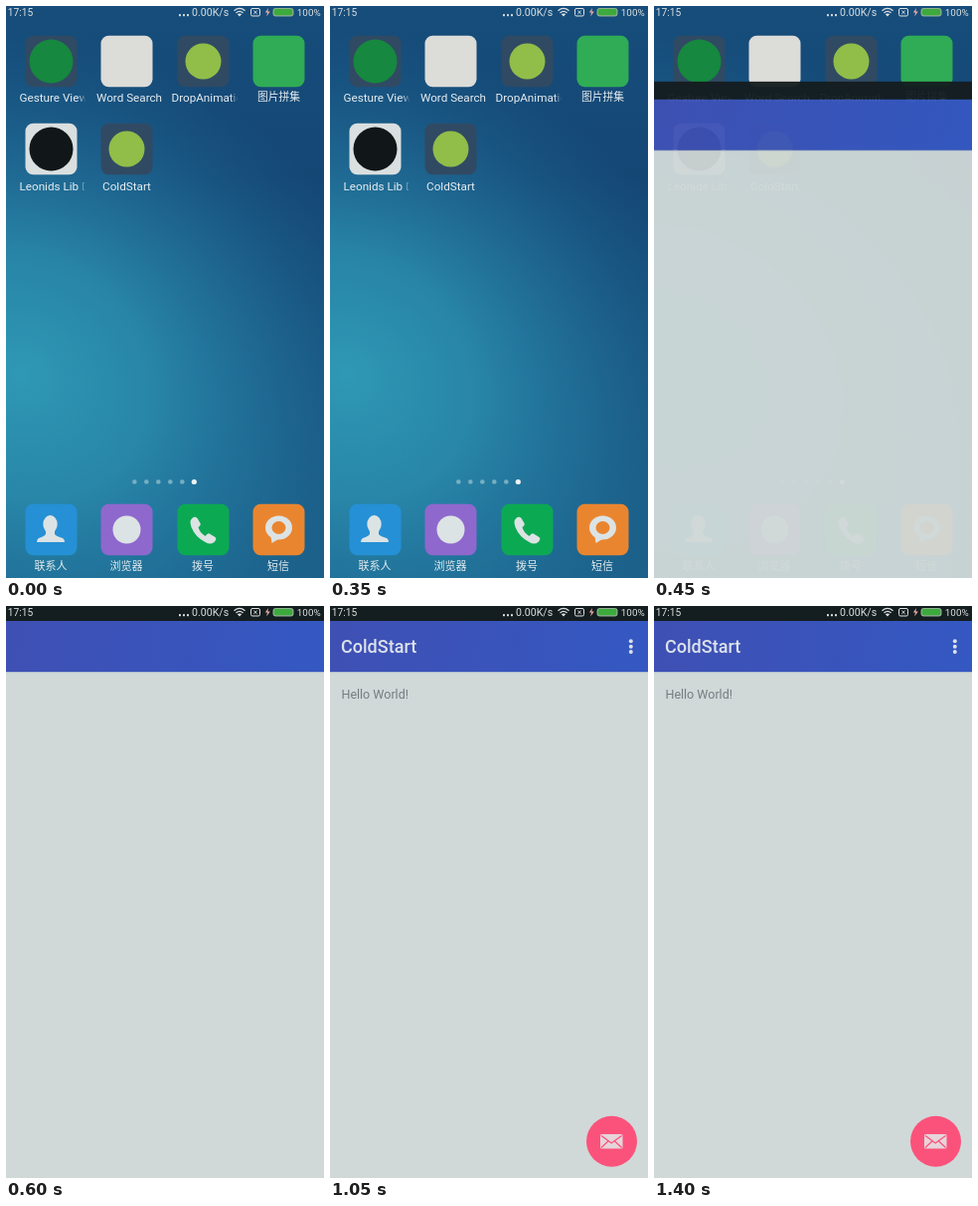
An HTML page with a canvas that plays this animation: 320x574 px, repeating every 1.45 s.

```html
<!DOCTYPE html>
<html lang="en">
<head>
<meta charset="utf-8">
<title>Cold start</title>
<style>
html, body { margin: 0; width: 100%; height: 100%; overflow: hidden; background: #145080; }
canvas { display: block; width: 320px; height: 574px; }
</style>
</head>
<body>
<canvas id="stage"></canvas>
<script>
const W = 320, H = 574, LOOP = 1450, STEP = 50;
const OPEN_START = 360, OPEN_TIME = 240, FADE_TIME = 140, CONTENT_AT = 1050;
const FONT = 'Roboto, "Noto Sans CJK SC", "Noto Sans CJK", sans-serif';
const COLUMNS = [45.5, 121.5, 198.5, 274.5];
const TILE = '#304a63';

const canvas = document.getElementById('stage');
const ctx = canvas.getContext('2d');
const ratio = window.devicePixelRatio || 1;
canvas.width = W * ratio;
canvas.height = H * ratio;
ctx.scale(ratio, ratio);

function rect(x, y, w, h, color) {
  ctx.fillStyle = color;
  ctx.fillRect(x, y, w, h);
}

function round(x, y, w, h, r, color) {
  ctx.fillStyle = color;
  ctx.beginPath();
  ctx.roundRect(x, y, w, h, r);
  ctx.fill();
}

function ellipse(x, y, rx, ry, color) {
  ctx.fillStyle = color;
  ctx.beginPath();
  ctx.ellipse(x, y, rx, ry, 0, 0, Math.PI * 2);
  ctx.fill();
}

function disc(x, y, r, color) {
  ellipse(x, y, r, r, color);
}

function shape(path, color, x = 0, y = 0) {
  ctx.save();
  ctx.translate(x, y);
  ctx.fillStyle = color;
  ctx.fill(new Path2D(path));
  ctx.restore();
}

function stroke(path, color, width) {
  ctx.strokeStyle = color;
  ctx.lineWidth = width;
  ctx.stroke(new Path2D(path));
}

function text(str, x, y, size, color, weight = 400, align = 'left') {
  ctx.font = `${weight} ${size}px ${FONT}`;
  ctx.textAlign = align;
  ctx.textBaseline = 'middle';
  ctx.fillStyle = color;
  ctx.fillText(str, x, y);
}

// Labels too wide for their cell fade out at the right edge.
function label(str, cx, y, size = 11.7) {
  ctx.font = `400 ${size}px ${FONT}`;
  if (ctx.measureText(str).width <= 67.5) {
    text(str, cx, y, size, '#e6edef', 400, 'center');
    return;
  }
  const left = cx - 32, right = cx + 35;
  const fade = ctx.createLinearGradient(left, 0, right, 0);
  fade.addColorStop(0, '#e6edef');
  fade.addColorStop(0.88, '#e6edef');
  fade.addColorStop(1, '#e6edef00');
  text(str, left, y, size, fade);
}

function wallpaper() {
  const base = ctx.createLinearGradient(0, 0, 0, H);
  base.addColorStop(0, '#164d7b');
  base.addColorStop(0.3, '#154775');
  base.addColorStop(1, '#1b5f88');
  rect(0, 0, W, H, base);

  ctx.save();
  ctx.translate(15, 370);
  ctx.rotate(0.5);
  ctx.scale(1, 0.88);
  const glow = ctx.createRadialGradient(0, 0, 0, 0, 0, 390);
  glow.addColorStop(0, 'rgba(48,156,184,.95)');
  glow.addColorStop(0.35, 'rgba(44,146,178,.8)');
  glow.addColorStop(0.65, 'rgba(38,130,170,.45)');
  glow.addColorStop(1, 'rgba(28,105,150,0)');
  rect(-600, -700, 1300, 1400, glow);
  ctx.restore();
}

function tile(cx, y, color, dot, r) {
  round(cx - 26, y - 0.3, 52, 51.6, 8, color);
  if (dot) disc(cx, y + 25.5, r, dot);
}

function dock() {
  const [a, b, c, d] = COLUMNS;
  const glyph = '#dce3e4', orange = '#ea852f';
  tile(a, 500, '#2590d5');
  tile(b, 500, '#8e68cd', glyph, 14);
  tile(c, 500, '#0ca953');
  tile(d, 500, orange);

  ellipse(a - 1, 520, 7.2, 9, glyph);
  shape('M-5 25h9v5q1 2 8 4q2 1 2 4h-28q0-3 2-4q6-2 7-4z', glyph, a - 0.5, 500);
  shape('M-12-10q3-4 6-1l3 5q1 2-2 4q1 5 7 9q3-4 5-2l5 3q2 2-1 5q-4 3-9 0q-10-5-14-15q-2-6 0-8z', glyph, c, 525);
  ellipse(d, 523.5, 13.5, 12, glyph);
  shape('M-8 32L-7 39L3 33z', glyph, d, 500);
  ellipse(d, 523.5, 7, 6.4, orange);

  ['联系人', '浏览器', '拨号', '短信'].forEach((s, i) => label(s, COLUMNS[i] - 0.5, 562.5, 11));
}

function home() {
  wallpaper();
  const [a, b, c, d] = COLUMNS;
  tile(a, 30, TILE, '#16883f', 22);
  tile(b, 30, '#dcdcd8');
  tile(c, 30, TILE, '#91bd49', 18);
  tile(d, 30, '#2fac55');
  tile(a, 118, '#dadfdf', '#111718', 22);
  tile(b, 118, TILE, '#91bd49', 18);

  label('Gesture View', a, 92.5);
  label('Word Search', b + 2.5, 92.5);
  label('DropAnimation', c, 92.5);
  label('图片拼集', d, 92, 10.8);
  label('Leonids Lib Demo', a, 181.5);
  label('ColdStart', b, 181.5);

  for (let i = 0; i < 6; i++) {
    disc(129.3 + i * 12, 477.5, i === 5 ? 2.6 : 2.3, i === 5 ? '#eef3f3' : '#77afc3');
  }
  dock();
}

function appWindow(offset, alpha, ready) {
  ctx.save();
  ctx.globalAlpha = alpha;
  ctx.translate(0, offset);
  rect(0, -3, W, 18, '#141d1f');
  const bar = ctx.createLinearGradient(0, 15, W, 66);
  bar.addColorStop(0, '#3f50b4');
  bar.addColorStop(1, '#3458c2');
  rect(0, 15, W, 51, bar);
  rect(0, 66, W, H - 66, '#d0d9d8');
  rect(0, 66, W, 1, '#b4c0cc');

  if (ready) {
    text('ColdStart', 11, 41.5, 18, '#dde2ea', 500);
    [35.3, 40.7, 46.1].forEach(y => disc(302.8, y, 2, '#dde2ea'));
    text('Hello World!', 11.5, 89.5, 12.5, '#747d80');
    disc(283.5, 537.3, 25.5, '#fb527b');
    round(272, 530, 22.5, 14.5, 1.5, '#e6d5da');
    stroke('M273 531.5L283.2 539L293.5 531.5M273 543.5L280 537M293.5 543.5L286.5 537', '#fb527b', 1.2);
  }
  ctx.restore();
}

function statusBar() {
  const ink = '#dce0e0';
  text('17:15', 1.8, 6.8, 10.2, ink);
  for (let i = 0; i < 3; i++) rect(174 + i * 4, 8.2, 2, 2, ink);
  text('0.00K/s', 187, 6.8, 10.6, ink);
  stroke('M229.5 4.7q5.5-4.5 11 0M231.5 6.9q3.5-3 7 0', ink, 1.3);
  shape('M232.8 8.2q2.2-1.5 4.4 0l-2.2 2.4z', ink);
  ctx.strokeStyle = ink;
  ctx.lineWidth = 1;
  ctx.beginPath();
  ctx.roundRect(246.5, 2.5, 9, 7.5, 1.5);
  ctx.stroke();
  stroke('M249.4 4.8l3.2 3M252.6 4.8l-3.2 3', ink, 1);
  shape('M264 2l-3.2 4.6h2.2l-.8 3.8l3.6-5h-2.4z', '#e7a9a4');
  round(268.5, 2, 21, 8.4, 3, '#8eae91');
  round(269.7, 3.1, 18.6, 6.2, 2, '#3caa3c');
  text('100%', 292.8, 6.8, 9.9, ink);
}

const clamp = v => Math.min(1, Math.max(0, v));
const easeOut = v => 1 - (1 - v) ** 3;

function draw(time) {
  const opened = clamp((time - OPEN_START) / OPEN_TIME);
  const alpha = easeOut(clamp((time - OPEN_START) / FADE_TIME));
  if (opened < 1) home();
  if (opened > 0) appWindow(323 * (1 - easeOut(opened)), alpha, time >= CONTENT_AT);
  statusBar();
}

// The picture advances in fixed steps, as in a 20 fps recording.
const start = performance.now();
function tick() {
  const time = (performance.now() - start) % LOOP;
  draw(Math.floor(time / STEP) * STEP);
  requestAnimationFrame(tick);
}
tick();
</script>
</body>
</html>
```
